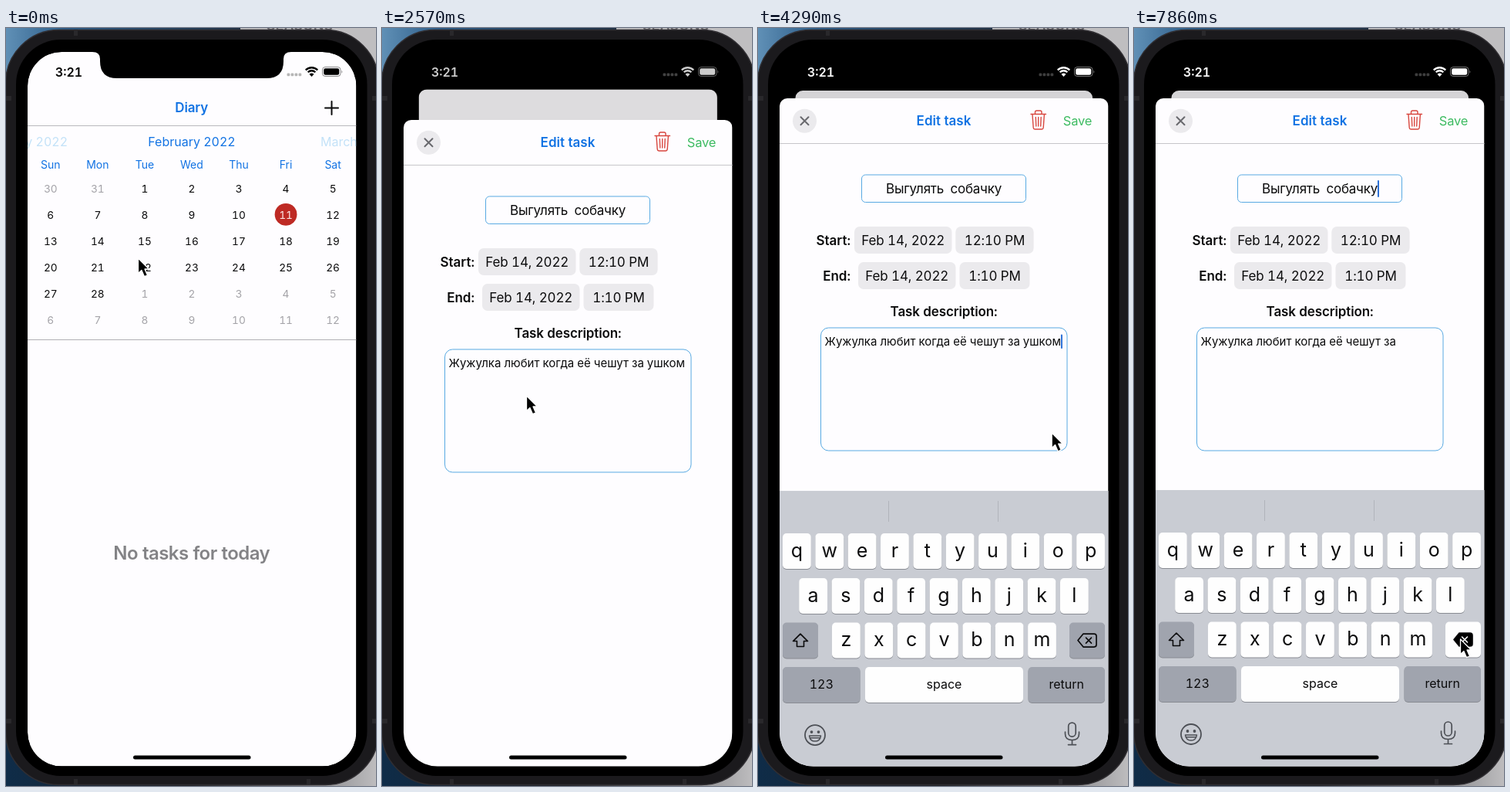
An HTML page for the animation above (8000 ms loop, 480x981 px).

```html
<!DOCTYPE html>
<html lang="en">
<head>
<meta charset="utf-8">
<title>Diary</title>
<style>
  html, body { margin: 0; width: 100%; height: 100%; overflow: hidden; background: #000; }
  svg { display: block; width: 100vw; height: 100vh; }
  text {
    font-family: Inter, "Open Sans", sans-serif; font-optical-sizing: none;
    font-variant-numeric: tabular-nums; white-space: pre;
  }
</style>
</head>
<body>
<svg id="stage" viewBox="0 0 480 981"></svg>
<script>
const LOOP = 8000;
const FRAME_RATE = 7;
const PAPER = '#fefdff', BLUE = '#1273e3', GREY = '#a4a3a8', INK = '#0b0b0c';
const NOTE = 'Жужулка любит когда её чешут за ушком';
const TASK = 'Выгулять\u00a0 собачку';

const SELECT_AT = 857, SHEET_AT = 2283, KEYS_AT = 3847, TITLE_AT = 6800;
const DELETES = [4850, 5130, 5280, 5420, 5560];
const PRESSES = [...DELETES, 7900];

// time, x, y of the pointer tip
const POINTER = [
  [0, 172, 298], [570, 120, 277], [1000, 120, 277], [1571, 147, 517],
  [2200, 185, 479], [2571, 188, 476], [2860, 190, 474], [3700, 366, 420],
  [4050, 366, 420], [4720, 421, 786], [5720, 421, 786], [6286, 331, 282],
  [6650, 319, 213], [6950, 319, 213], [7600, 424, 791], [8000, 424, 791]
];

const text = (x, y, str, size, fill = INK, o = {}) =>
  `<text x="${x}" y="${y}" font-size="${size}" fill="${fill}" font-weight="${o.weight || 400}"
    text-anchor="${o.anchor || 'middle'}" letter-spacing="${o.track || 0}em" ${o.id ? `id="${o.id}"` : ''}>${str}</text>`;
const rect = (x, y, w, h, fill, rx = 0, extra = '') =>
  `<rect x="${x}" y="${y}" width="${w}" height="${h}" rx="${rx}" fill="${fill}" ${extra}/>`;
const line = (x1, y1, x2, y2, stroke, w = 1) =>
  `<path d="M${x1} ${y1}L${x2} ${y2}" stroke="${stroke}" stroke-width="${w}"/>`;
const stroke = (d, color, w, extra = '') =>
  `<path d="${d}" fill="none" stroke="${color}" stroke-width="${w}" stroke-linecap="round" stroke-linejoin="round" ${extra}/>`;

const columnX = i => 57.8 + 61.05 * i;
const rowY = i => 212.5 + 34 * i;

function calendar() {
  let out = '';
  'Sun Mon Tue Wed Thu Fri Sat'.split(' ').forEach((day, i) => {
    out += text(columnX(i), 182.3, day, 14, BLUE);
  });
  out += `<circle cx="${columnX(5)}" cy="241.3" r="14.4" fill="#be2a24"/>`;
  for (let i = 0; i < 42; i++) {
    const offset = i - 1;
    const inMonth = offset >= 1 && offset <= 28;
    const day = offset < 1 ? offset + 31 : offset > 28 ? offset - 28 : offset;
    const fill = offset === 11 ? '#fbe9e8' : inMonth ? INK : GREY;
    out += text(columnX(i % 7), rowY(Math.floor(i / 7)), day, 13.7, fill);
  }
  return out;
}

function taskRow(y, hours) {
  const small = { weight: 300, anchor: 'end', track: -.015 };
  return text(48.5, y + 5.5, hours, 15, '#85858a', { weight: 600, anchor: 'start' }) +
    line(48, y + 14.5, 455, y + 14.5, '#d2d2d5') +
    text(43, y + 43.3, TASK, 17, INK, { anchor: 'start', track: -.015 }) +
    text(430, y + 32, '14 Feb, 12:10', 11.2, '#8e8e93', small) +
    line(358, y + 37.3, 430.5, y + 37.3, '#4a9fe6') +
    text(430, y + 51.3, '14 Feb, 13:10', 11.2, '#8e8e93', small) +
    stroke(`M438.5 ${y + 31.5}l6 6-6 6`, BLUE, 1.8) +
    line(48, y + 59.5, 455, y + 59.5, '#d2d2d5');
}

function page() {
  return rect(28, 31, 426.5, 924.5, PAPER) +
    text(240.7, 109.3, 'Diary', 17, BLUE, { weight: 600, track: -.01 }) +
    stroke('M422.5 95v17M414 103.5h17', INK, 2) +
    line(28, 126.5, 455, 126.5, '#b9b9bd') +
    text(241, 153, 'February 2022', 16, BLUE) +
    text(80, 153, 'January 2022', 16, '#c3e2f8', { anchor: 'end' }) +
    text(408, 153, 'March 2022', 16, '#c3e2f8', { anchor: 'start' }) +
    calendar() +
    line(28, 403.5, 455, 403.5, '#b0b0b4') +
    `<g id="empty">${text(240.7, 688, 'No tasks for today', 24, '#838386', { weight: 600, track: -.023 })}</g>
     <g id="tasks">
       <circle cx="${columnX(1)}" cy="275.3" r="14.4" fill="#1f6dd8"/>
       ${text(columnX(1), rowY(2), 14, 13.7, '#fff')}
       ${taskRow(441, '12:00 - 13:00')}${taskRow(539, '13:00 - 14:00')}
     </g>`;
}

function pill(x, y, w, label) {
  return rect(x, y, w, 35, '#ebeaed', 7) + text(x + w / 2, y + 23.6, label, 17, INK, { track: -.008 });
}

function sheet() {
  const bold = { weight: 600 };
  const border = 'stroke="#58a9e2"';
  return rect(28, 91, 426.5, 900, PAPER, 10) +
    '<circle cx="60.5" cy="120.3" r="15.5" fill="#ebeaed"/>' +
    stroke('M55.5 115.3l10 10m0-10l-10 10', '#69696e', 2) +
    text(241, 126, 'Edit task', 17, BLUE, bold) +
    stroke('M354 111.5h19.5M359.5 111v-2q0-2 2-2h4.5q2 0 2 2v2M356 112l1.2 17q.2 2 2 2h9q1.8 0 2-2l1.2-17M360.3 115.5l.5 11.5M363.7 115.5v11.5M367.2 115.5l-.5 11.5', '#d8473f', 1.4) +
    text(414.5, 126, 'Save', 16.5, '#3dbb61', { track: -.01 }) +
    line(28, 149.5, 455, 149.5, '#c6c6ca') +
    rect(134.5, 190, 213, 35.5, PAPER, 5, border) +
    text(241, 214, TASK, 17, INK, { track: -.015, id: 'title' }) +
    text(120, 280.6, 'Start:', 17, INK, { ...bold, anchor: 'end' }) +
    pill(125, 257, 126.5, 'Feb 14, 2022') + pill(256.3, 257, 101.3, '12:10 PM') +
    text(120, 326.6, 'End:', 17, INK, { ...bold, anchor: 'end' }) +
    pill(130, 303, 126.5, 'Feb 14, 2022') + pill(261.5, 303, 91, '1:10 PM') +
    text(241, 373.2, 'Task description:', 17, INK, { ...bold, track: -.007 }) +
    rect(81.5, 388, 319.5, 159, PAPER, 10, border) +
    text(86.5, 411, NOTE, 15, INK, { anchor: 'start', id: 'note' }) +
    rect(0, 396.5, 2, 18.5, '#2a6fd6', 1, 'id="noteCaret"') +
    rect(0, 197, 2, 22, '#2a6fd6', 1, 'id="titleCaret"');
}

function key(x, y, w, fill, label = '', size = 16, id = '') {
  return rect(x, y + 1, w, 46, '#898c93', 5) + rect(x, y, w, 46, fill, 5, id && `id="${id}"`) +
    (label && text(x + w / 2, y + (size > 20 ? 30.5 : 28.3), label, size));
}

function keyboard() {
  const dark = '#a0a4ae', ink = '#4d5056';
  let out = rect(28, 598, 427, 400, '#c9ccd3') +
    line(169.5, 611, 169.5, 638, '#b1b4bb') + line(311.5, 611, 311.5, 638, '#b1b4bb');
  [['qwertyuiop', 32, 653], ['asdfghjkl', 53.2, 711], ['zxcvbnm', 96, 768.5]].forEach(([letters, x, y]) => {
    [...letters].forEach((c, i) => { out += key(x + 42.35 * i, y, 36.8, '#fefefe', c, 25); });
  });
  const back = 'M422 783h14q3 0 3 3v11q0 3-3 3h-14l-7-8.5Z';
  return out +
    key(32, 768.5, 46, dark) + stroke('M55 783l9.5 9.5h-5v7h-9v-7h-5Z', INK, 1.6) +
    key(404, 768.5, 46, dark, '', 16, 'backKey') +
    stroke(back, INK, 1.7, 'id="backIcon"') +
    stroke('M425.5 788l7 7m0-7l-7 7', INK, 1.6, 'id="backCross"') +
    key(32, 826, 100.5, dark, '123') + key(139, 826, 205, '#fefefe', 'space') +
    key(350.5, 826, 99.5, dark, 'return') +
    `<circle cx="74" cy="914" r="13" fill="none" stroke="${ink}" stroke-width="1.8"/>
     <circle cx="69.5" cy="910" r="1.9" fill="${ink}"/><circle cx="78.5" cy="910" r="1.9" fill="${ink}"/>` +
    stroke('M66.5 915h15q-1 7-7.5 7t-7.5-7ZM67.5 917.8h13', ink, 1.5) +
    rect(402.7, 898, 9.5, 18, 'none', 4.75, `stroke="${ink}" stroke-width="1.7"`) +
    stroke('M398.5 910v2.5q0 8 9 8t9-8v-2.5M407.5 920.5v6M402.5 926.5h10', ink, 1.7) +
    `<g id="hints">${text(98.5, 630.5, 'I', 16)}${text(241, 630.5, 'and', 16)}${text(383, 630.5, 'your', 16)}</g>`;
}

function statusBar() {
  const arc = r => `M${396.5 - r * .72} ${62 - r * .7}A${r} ${r} 0 0 1 ${396.5 + r * .72} ${62 - r * .7}`;
  const dots = [0, 1, 2, 3].map(i =>
    `<rect x="${364.5 + 5 * i}" y="58.5" width="3.8" height="3.8" rx="1.2"/>`).join('');
  return `<g id="dots">${dots}</g><g id="status">
    <text x="81.5" y="62.5" font-size="16" font-weight="600" text-anchor="middle">3:21</text>
    <path d="M396.5 63l-3-3.2q3-2.6 6 0Z"/>
    <g fill="none" stroke-width="2.3"><path d="${arc(6.7)}"/><path d="${arc(10.7)}"/></g>
    <rect x="410.5" y="50.5" width="23.5" height="12" rx="3.6" fill="none" stroke-opacity=".45"/>
    <rect x="412.2" y="52.2" width="20" height="8.6" rx="2.2"/>
    <path d="M435.5 54.5q1.6 2 0 4Z" fill-opacity=".5"/></g>`;
}

function backdrop() {
  return `<defs>
    <linearGradient id="sea"><stop stop-color="#6090b6"/><stop offset=".25" stop-color="#2c5c88"/><stop offset="1" stop-color="#1d2f44"/></linearGradient>
    <linearGradient id="floor"><stop stop-color="#0f2c48"/><stop offset=".5" stop-color="#1c2026"/><stop offset="1" stop-color="#bdbcbe"/></linearGradient>
    <clipPath id="screen"><rect x="28" y="31" width="426.5" height="924.5" rx="44"/></clipPath>
    <clipPath id="pageClip"><rect id="pageShape" x="28" y="31" width="426.5" height="924.5"/></clipPath></defs>` +
    rect(0, 0, 304, 500, 'url(#sea)') + rect(304, 0, 176, 500, '#bfbec0') + rect(0, 500, 480, 481, 'url(#floor)') +
    text(381, 2.5, 'SEASONS', 18, '#66656a', { weight: 600 }) +
    rect(-.5, 2.5, 484, 977, '#1b1a1d', 69, 'stroke="#302e32" stroke-width="1.5"') +
    [91, 897].map(y => rect(0, y - 3, 7, 6, '#29282b') + rect(475, y - 3, 5, 6, '#29282b')).join('') +
    rect(88, 2, 5, 8, '#29282b') + rect(88, 972, 5, 7, '#29282b') + rect(390, 972, 5, 7, '#29282b') +
    rect(13, 15, 455.5, 953, '#000', 58);
}

document.getElementById('stage').innerHTML = backdrop() +
  `<g clip-path="url(#screen)">
     <g id="page" clip-path="url(#pageClip)">${page()}${rect(28, 31, 427, 925, '#000', 0, 'id="dim"')}</g>
     <g id="sheet">${sheet()}</g><g id="keyboard">${keyboard()}</g>
   </g>
   <path d="M112 30h258v1q-10 0-10 9v3q0 22-22 22H144q-22 0-22-22v-3q0-9-10-9Z"/>` +
  statusBar() + rect(165, 941.5, 152.5, 5, '#000', 2.5) +
  `<path id="pointer" d="M-.5 0V19.5l4.400-4 3.600 8.200 4-1.700-3.500-8H13.500Z" fill="#000" stroke="#fff" stroke-width="1.3" stroke-linejoin="round"/>`;

const el = id => document.getElementById(id);
const show = (id, on) => el(id).setAttribute('visibility', on ? 'visible' : 'hidden');
const set = (id, attrs) => Object.entries(attrs).forEach(([name, value]) => el(id).setAttribute(name, value));
const mix = (a, b, p) => a + (b - a) * p;
const grey = v => `rgb(${v},${v},${v})`;
const blink = elapsed => elapsed >= 0 && elapsed % 1000 < 500;

function spring(ms) {
  const x = Math.max(0, ms) * .01826;
  return 1 - (1 + x) * Math.exp(-x);
}

function pointerAt(t) {
  const i = Math.max(1, POINTER.findIndex(p => p[0] > t));
  const [t0, x0, y0] = POINTER[i - 1], [t1, x1, y1] = POINTER[i];
  const u = (t - t0) / (t1 - t0), e = u * u * (3 - 2 * u);
  return [mix(x0, x1, e), mix(y0, y1, e)];
}

function draw(t) {
  const rise = spring(t - SHEET_AT);
  const light = Math.min(1, Math.max(0, (t - SHEET_AT) / 360));
  const scale = mix(1, .905, rise);
  show('empty', t < SELECT_AT);
  show('tasks', t >= SELECT_AT);
  set('page', { transform: `translate(${241.25 * (1 - scale)} ${mix(31, 81, rise) - 31 * scale}) scale(${scale})` });
  set('pageShape', { rx: mix(44, 11, rise) });
  set('dim', { opacity: .16 * light });
  set('sheet', { transform: `translate(0 ${864 * (1 - rise)})` });
  show('sheet', t > SHEET_AT);

  const tone = grey(Math.round(255 * light));
  set('status', { fill: tone });
  el('status').querySelectorAll('[fill=none]').forEach(node => node.setAttribute('stroke', tone));
  set('dots', { fill: grey(Math.round(mix(182, 62, rise))) });

  set('keyboard', { transform: `translate(0 ${357 * (1 - spring(t - KEYS_AT))})` });
  show('keyboard', t > KEYS_AT);
  show('hints', t >= DELETES[4] && t < TITLE_AT);

  const done = DELETES.filter(d => d <= t);
  const note = el('note');
  note.textContent = NOTE.slice(0, NOTE.length - done.length);
  const lastEdit = done.length ? done[done.length - 1] : KEYS_AT;
  set('noteCaret', { x: 86.5 + note.getComputedTextLength() });
  show('noteCaret', t > KEYS_AT && t < TITLE_AT && blink(t - lastEdit));
  set('titleCaret', { x: 241 + el('title').getComputedTextLength() / 2 });
  show('titleCaret', blink(t - TITLE_AT));

  const pressed = PRESSES.some(p => t > p - 80 && t < p + 90);
  set('backKey', { fill: pressed ? '#fefefe' : '#a0a4ae' });
  set('backIcon', { fill: pressed ? '#000' : 'none' });
  set('backCross', { stroke: pressed ? '#fff' : INK });

  set('pointer', { transform: `translate(${pointerAt(t)})` });
}

function tick() {
  const t = performance.now() % LOOP;
  const step = Math.min(55, Math.floor((t + 5) * FRAME_RATE / 1000));
  draw(step * 1000 / FRAME_RATE);
  requestAnimationFrame(tick);
}
tick();
</script>
</body>
</html>
```
